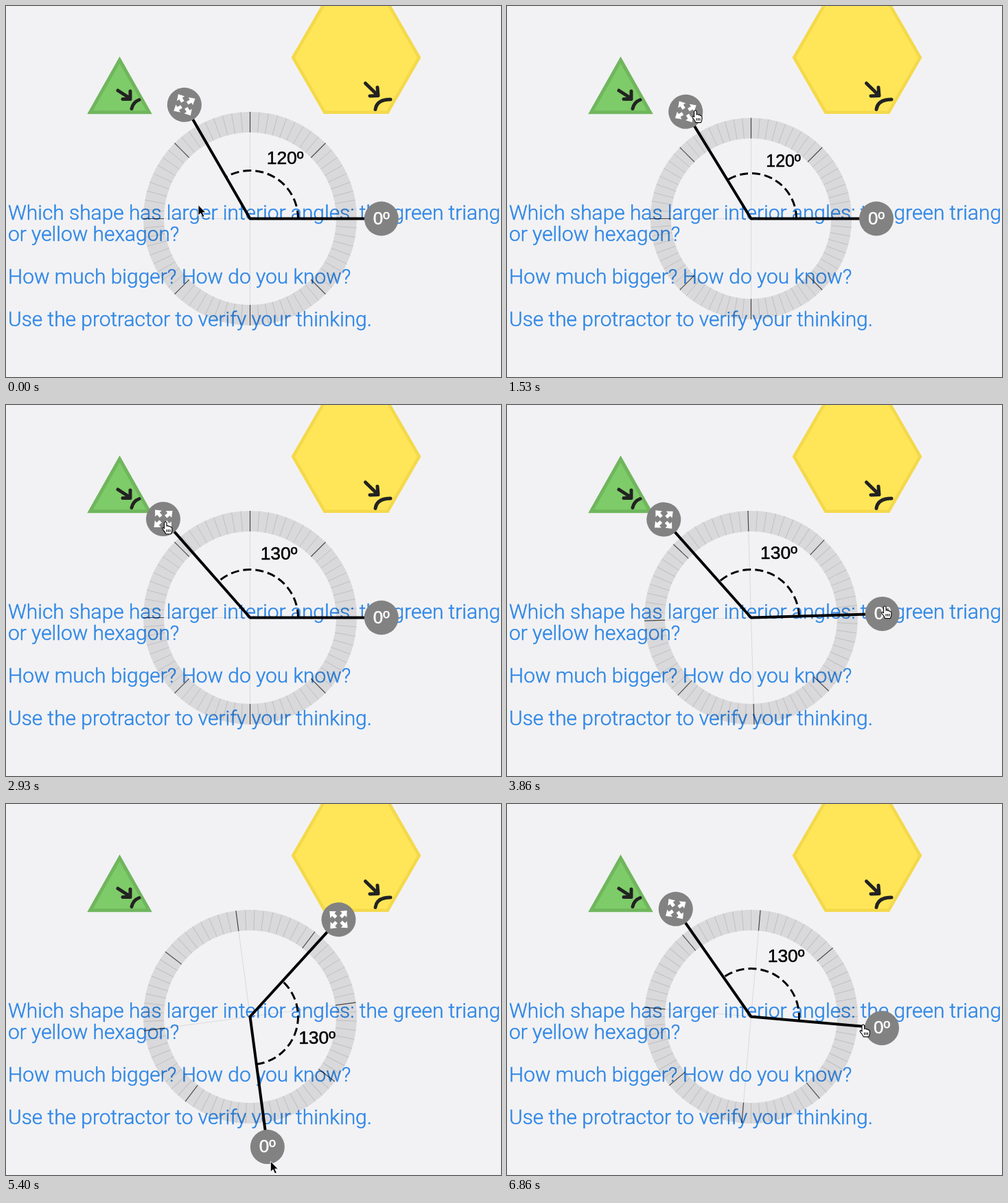
Write an HTML page that moves like this. It is 721 px wide and 540 px high and loops after 7.46 s.

```html
<!DOCTYPE html>
<html lang="en">
<head>
<meta charset="utf-8">
<title>Protractor</title>
<style>
  html, body { margin: 0; width: 100%; height: 100%; overflow: hidden; background: #f2f2f4; }
  svg { display: block; width: 721px; height: 540px; }
  .prompt { font: 300 29.9px Roboto, sans-serif; fill: #2f87e6; stroke: #2f87e6; stroke-width: .5; }
  .pen { fill: none; stroke: #222; stroke-width: 5; stroke-linecap: round; stroke-linejoin: round; }
  .label { font-family: "Liberation Sans", Arial, sans-serif; text-anchor: middle; stroke-width: .5; }
  .line { fill: none; stroke: #000; }
</style>
</head>
<body>
<svg viewBox="0 0 721 540">
  <g class="prompt">
    <text x="3" y="310.5">Which shape has larger interior angles: the green triangle</text>
    <text x="3" y="341.5">or yellow hexagon?</text>
    <text x="3" y="404">How much bigger? How do you know?</text>
    <text x="3" y="466.3">Use the protractor to verify your thinking.</text>
  </g>

  <path d="M165.5 78.5L208.5 154.7H122.5z" fill="#7ecb69" stroke="#70b65d" stroke-width="5"/>
  <path d="M418.2 75L464.1 -4.5H555.9L601.8 75L555.9 154.7H464.1z" fill="#ffe658" stroke="#f4d94b" stroke-width="4.6"/>
  <path class="pen" d="M163 123L180 134M181 124L181 135.500L170 135.500M183 149.500Q185 140 194 136.500"/>
  <path class="pen" d="M523.500 112.500L541 129.500M541 118.500L542 130.500L530 131M538 150.500Q540 136 560 136"/>

  <g transform="translate(355.5 309.5)">
    <g id="dial">
      <circle id="ring" fill="none" stroke="#000" stroke-opacity=".1" stroke-width="30"/>
      <path id="axes" class="line" stroke-opacity=".1"/>
      <path id="minor" class="line" stroke-opacity=".12"/>
      <path id="major" class="line" stroke-opacity=".65" stroke-width="1.2"/>
    </g>
    <path id="arc" class="line" stroke-width="3" stroke-dasharray="12 6"/>
    <path id="arms" class="line" stroke-width="4" stroke-linejoin="round"/>
    <text id="angle" class="label" stroke="#000"></text>
    <g id="zero">
      <circle r="25" fill="#828282"/>
      <text class="label" y="8.300" font-size="26" fill="#fff" stroke="#fff">0º</text>
    </g>
    <g id="grip">
      <circle r="25" fill="#828282"/>
      <g id="arrows" fill="#fff"></g>
    </g>
    <path id="arrow" d="M0 0V15.500L3.600 12.200L6.300 18L9 16.800L6.400 11.200H11z" fill="#000" stroke="#fff" stroke-width=".9"/>
    <g id="hand" stroke="#111" stroke-width="1.2" stroke-linejoin="round">
      <path fill="#fff" d="M-1.8 1.5Q0-1.2 1.800 1.500V6.500Q3.400 5 4.600 7Q6.400 6 7.300 8Q9.600 7.600 9.600 10V12.500Q9.600 15 8 18H.5Q-.5 15-4.200 11Q-5.400 8.600-3.200 8.800L-1.800 10z"/>
      <path fill="none" d="M1.800 11.500V15M4.200 11.500V15M6.600 11.500V15"/>
    </g>
  </g>
</svg>
<script>
const LOOP = 7460, STEP = 200 / 3, LEAD = 45;
const GRIP_DROP = 3150, ZERO_DROP = 6350;
const $ = id => document.getElementById(id);
const set = (id, attrs) => { for (const k in attrs) $(id).setAttribute(k, attrs[k]); };

// Turning points of each drag: [ms, value].
const radius = [[600, 155.5], [735, 168], [1533, 146.7], [1667, 151], [1800, 151], [2600, 122.4], [2930, 155.5]];
const spread = [[600, 120], [1100, 165], [1700, 112], [1800, 112], [2600, 177], [2930, 131.4]];
const turn = [[3800, 0], [4000, 6.7], [4333, -68], [4800, 8.5], [5433, -83], [6100, 6], [6333, -3.8]];

const mix = (a, b, u) => a + (b - a) * u;
const ease = (t, t0, t1) => {
  const u = Math.min(1, Math.max(0, (t - t0) / (t1 - t0)));
  return (1 - Math.cos(Math.PI * u)) / 2;
};
const swing = (keys, t) => keys.reduce(
  (v, [t1, v1], i) => i ? mix(v, v1, ease(t, keys[i - 1][0], t1)) : v1, 0);
const snap = deg => Math.round(deg / 5) * 5;
const polar = (r, deg) => {
  const a = deg * Math.PI / 180;
  return [r * Math.cos(a), -r * Math.sin(a)];
};
const move = p => `translate(${p})`;

// A handle snaps to 5 degrees when it is let go.
const spreadAt = t => t > GRIP_DROP ? snap(swing(spread, t)) : swing(spread, t);
const turnAt = t => t > ZERO_DROP ? snap(swing(turn, t)) : swing(turn, t);

function ticks(r, step, keep = () => true) {
  let d = "";
  for (let a = 0; a < 360; a += step) if (keep(a)) d += `M${polar(r - 30, a)}L${polar(r, a)}`;
  return d;
}

// The pointer runs a little ahead of the handle it drags.
function pointer(t, reach) {
  const base = turnAt(t + LEAD);
  const slip = mix(4, -28, ease(t, 3867, 4333)) + 50 * Math.sin(base * Math.PI / 180) ** 2;
  const onGrip = polar(reach - 5, spreadAt(Math.min(t + LEAD, GRIP_DROP)));
  const onZero = polar(reach + slip, base + 1);
  const idle = [-75.5, -20];
  const toGrip = ease(t, 0, 400), toZero = ease(t, 3134, 3667);
  return idle.map((v, i) => mix(mix(v, onGrip[i], toGrip), onZero[i], toZero));
}

function draw(t) {
  const r = swing(radius, t), reach = r + 35.8;
  const base = turnAt(t), open = spreadAt(t);
  const zero = polar(reach, base), grip = polar(reach, base + open);

  set("dial", { transform: `rotate(${-base})` });
  set("ring", { r: r - 15 });
  set("axes", { d: `M${-r} 0H${r}M0 ${-r}V${r}` });
  set("minor", { d: ticks(r, 5, a => a % 45) });
  set("major", { d: ticks(r, 45) });

  const bend = r * .45, size = r * .17, mid = polar(r * .657, base + open / 2);
  set("arc", { d: `M${polar(bend, base)}A${bend} ${bend} 0 0 0 ${polar(bend, base + open)}` });
  set("arms", { d: `M${zero}L0 0L${grip}` });
  set("angle", { x: mid[0], y: mid[1] + size * .33, "font-size": size });
  $("angle").textContent = snap(open) + "º";
  set("zero", { transform: move(zero) });
  set("grip", { transform: `${move(grip)} rotate(${-base - open})` });

  const p = pointer(t, reach);
  const near = h => Math.hypot(p[0] - h[0], p[1] - h[1]) < 38;
  const over = (near(zero) || near(grip)) && Math.hypot(...p) < reach + 18;
  set("hand", { transform: move(p), visibility: over ? "visible" : "hidden" });
  set("arrow", { transform: move(p), visibility: over ? "hidden" : "visible" });
}

$("arrows").innerHTML = [0, 90, 180, 270].map(a =>
  `<path d="M5-2.500H10.500V-6.500L18 0L10.500 6.500V2.500H5z" transform="rotate(${a})"/>`).join("");

const start = performance.now();
function tick() {
  const t = (performance.now() - start) % LOOP;
  draw(Math.floor((t + 7) / STEP) * STEP);
  requestAnimationFrame(tick);
}
draw(0);
requestAnimationFrame(tick);
</script>
</body>
</html>
```
